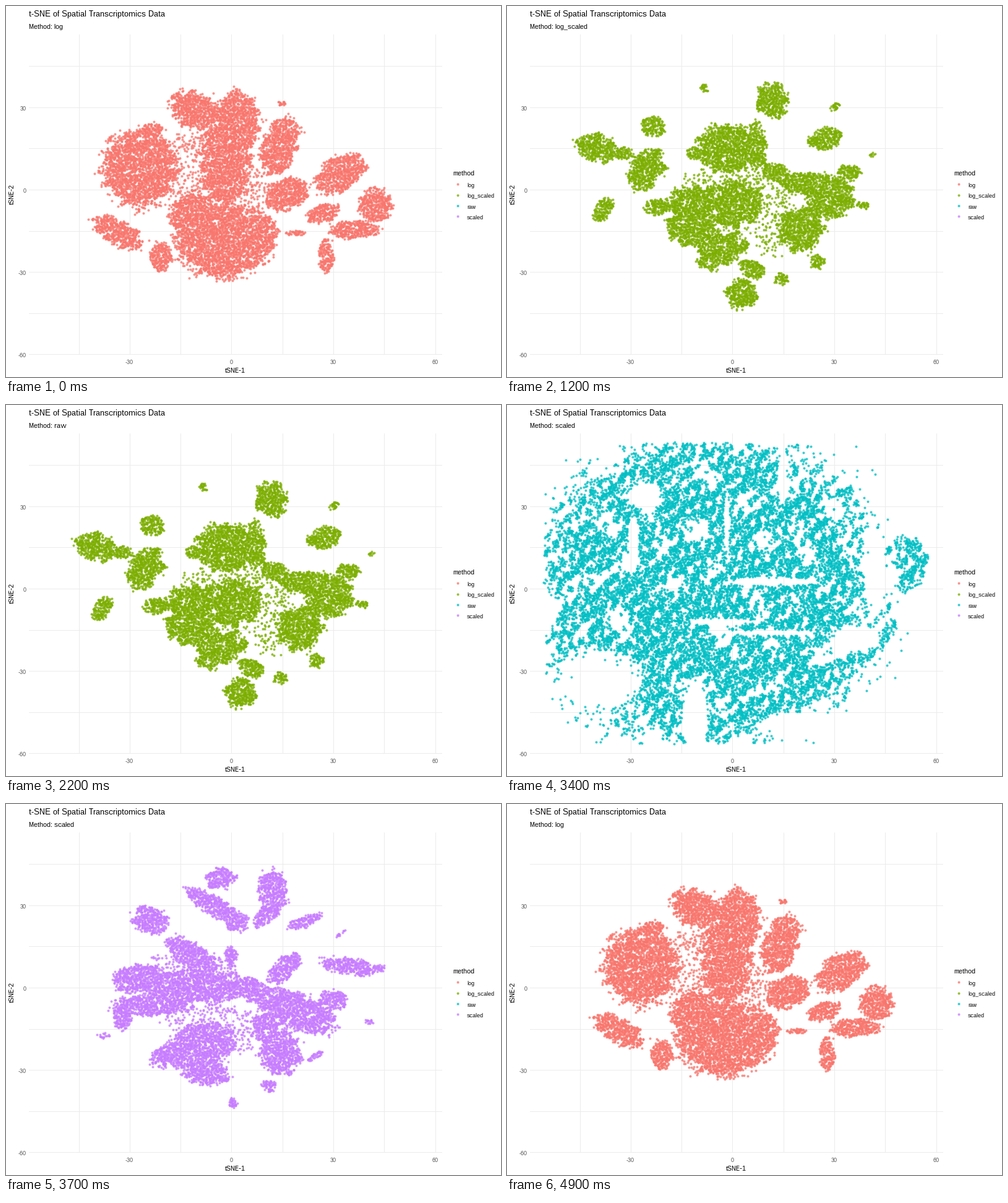
Animation, 800 px wide and 600 px high, one loop 5 s. Source, as a matplotlib script:

```python
import numpy as np
import matplotlib.pyplot as plt
from matplotlib.animation import FuncAnimation
from matplotlib.colors import to_rgba

WIDTH, HEIGHT, DPI = 800, 600, 100
PX = 72 / DPI
STEP_MS, LOOP_MS = 100, 5000
LEFT, RIGHT, TOP, BOTTOM = 37, 705, 46, 564
GRID, TICK = "#EBEBEB", "#4D4D4D"

METHODS = ["log", "log_scaled", "raw", "scaled"]
COLORS = ["#F8766D", "#7CAE00", "#00BFC4", "#C77CFF"]
TITLE_SWITCHES = [900, 2200, 3400, 4700]
CLOUD_SWITCHES = [1200, 2500, 3700, 4900]


def reach(x, y, blobs):
    """Squared distance to the nearest blob (x, y, rx, ry[, tilt]), 1 on its rim."""
    nearest = np.full(x.shape, np.inf)
    for cx, cy, rx, ry, *tilt in blobs:
        turn = np.radians(sum(tilt))
        c, s = np.cos(turn), np.sin(turn)
        dx, dy = x - cx, y - cy
        q = ((dx * c + dy * s) / rx) ** 2 + ((dy * c - dx * s) / ry) ** 2
        nearest = np.minimum(nearest, q)
    return nearest


def ripple(x, y, rng, shortest, longest, count=8):
    """Smooth random texture with unit spread."""
    total = 0
    for _ in range(count):
        angle, phase = rng.uniform(0, 2 * np.pi, 2)
        k = 2 * np.pi / rng.uniform(shortest, longest)
        total = total + np.sin(k * (x * np.cos(angle) + y * np.sin(angle)) + phase)
    return total / np.sqrt(count / 2)


def scatter_cloud(seed, blobs, haze=(), gaps=(), fill=0.9, clump=0.2, channels=0):
    """Seeded points that fill the blobs, thin out at rims and leave gaps."""
    rng = np.random.default_rng(seed)
    y, x = np.mgrid[62:548:2.2, 62:682:2.2].reshape(2, -1)
    x, y = x + rng.normal(0, 1.3, x.size), y + rng.normal(0, 1.3, y.size)
    fine = ripple(x, y, rng, 11, 30)
    broad = ripple(x, y, rng, 45, 90)

    def soft(shapes):
        return 1 / (1 + np.exp(np.minimum(9 * (reach(x, y, shapes) - 1 - 0.12 * fine), 50)))

    chance = (fill + clump * fine + channels * np.minimum(broad, 0)) * soft(blobs)
    chance = np.maximum(chance, 0.17 * soft(haze)) * (1 - soft(gaps))
    keep = rng.random(x.size) < chance
    return x[keep], y[keep]


log_points = scatter_cloud(11, [
    (217, 262, 58, 60), (235, 206, 17, 18), (372, 186, 36, 46), (308, 170, 45, 27, 25),
    (355, 240, 40, 85), (304, 340, 39, 40), (350, 378, 73, 57), (405, 370, 31, 38),
    (352, 422, 32, 19), (441, 226, 27, 46, 20), (453, 304, 35, 25, -20),
    (540, 270, 43, 25, -30), (597, 322, 26, 27), (562, 362, 39, 14), (512, 335, 25, 14, -15),
    (517, 404, 12, 26), (250, 404, 17, 23), (181, 366, 43, 19, 28), (467, 367, 16, 4),
    (445, 156, 7, 4),
], haze=[(305, 260, 45, 65), (400, 305, 25, 40)])

log_scaled_points = scatter_cloud(22, [
    (429, 152, 25, 27, -30), (513, 215, 27, 17, -15), (552, 270, 18, 12),
    (146, 230, 33, 21, 15), (188, 237, 18, 10), (236, 194, 18, 16), (225, 264, 25, 36, 35),
    (155, 329, 13, 20, 30), (358, 230, 50, 38), (402, 228, 16, 36), (304, 237, 14, 10),
    (436, 270, 24, 14, 25), (306, 318, 47, 29), (368, 320, 43, 37), (300, 360, 44, 26, 10),
    (241, 325, 19, 13), (348, 394, 42, 25, -25), (477, 287, 34, 17), (520, 308, 37, 35),
    (474, 360, 36, 35, -20), (378, 465, 24, 23), (396, 426, 20, 14, 25), (501, 413, 11, 12),
    (443, 442, 11, 9), (530, 163, 9, 5, -40), (590, 238, 6, 5), (320, 132, 6, 6),
    (574, 322, 9, 6),
], haze=[(380, 282, 85, 25), (425, 335, 35, 65)])

raw_points = scatter_cloud(33, [
    (325, 303, 255, 234), (88, 268, 21, 4), (238, 113, 31, 4), (546, 150, 10, 18, 30),
    (643, 256, 33, 42, 10), (585, 392, 11, 56, 50), (591, 228, 7, 3, -40),
], gaps=[
    (222, 147, 32, 22), (355, 190, 5, 60), (445, 120, 8, 45), (204, 220, 9, 45),
    (430, 285, 75, 7), (345, 350, 55, 6), (430, 368, 70, 5), (60, 330, 24, 30),
    (150, 445, 65, 50), (305, 500, 22, 60), (480, 520, 80, 22), (560, 378, 45, 22),
    (594, 270, 18, 65), (622, 278, 12, 20),
], fill=0.65, clump=0.35, channels=0.4)

scaled_points = scatter_cloud(44, [
    (346, 120, 23, 17), (430, 136, 22, 28), (427, 171, 35, 13, -45), (335, 164, 48, 15, 30),
    (373, 190, 18, 15), (233, 187, 28, 20, 15), (483, 190, 30, 8, -20), (300, 245, 47, 20, 35),
    (219, 283, 44, 24), (310, 295, 85, 26), (235, 325, 63, 16), (187, 345, 14, 20),
    (402, 303, 34, 17, 30), (449, 265, 32, 16, -45), (556, 262, 50, 13, 6),
    (528, 317, 22, 15), (468, 335, 62, 29, 20), (419, 358, 22, 24), (443, 402, 32, 34),
    (320, 385, 48, 32), (268, 403, 36, 19, -20), (320, 432, 38, 21, 10), (363, 246, 9, 17),
    (500, 408, 13, 5, -30), (425, 457, 12, 9), (367, 483, 7, 8), (157, 373, 10, 5),
    (587, 352, 8, 4), (540, 210, 11, 2, -35),
], haze=[(325, 350, 75, 25), (385, 370, 22, 35), (300, 262, 70, 25)])

plt.rcParams.update({"font.family": "Liberation Sans", "text.hinting": "native",
                     "text.hinting_factor": 1})
fig = plt.figure(figsize=(WIDTH / DPI, HEIGHT / DPI), dpi=DPI, facecolor="white")
ax = fig.add_axes([0, 0, 1, 1])
ax.set(xlim=(0, WIDTH), ylim=(HEIGHT, 0))
ax.axis("off")


def label(x, y, text, size=11, color="black", **style):
    return ax.text(x, y, text, fontsize=size * PX, color=color, **style)


def dots(x, y, color):
    tint = to_rgba(color, 0.7)
    return ax.plot(x, y, "o", ms=3 * PX, mew=PX, mfc=tint, mec=tint, zorder=3)[0]


def grid_line(x, y):
    ax.plot(x, y, color=GRID, lw=PX, snap=False, solid_capstyle="butt", zorder=1)


for i in range(8):
    x = int(118 + 82.3 * i) + 0.5
    y = int(97.6 + 66.6 * i) + 0.5
    grid_line([x, x], [TOP, BOTTOM])
    grid_line([LEFT, RIGHT], [y, y])

for i, value in enumerate((-30, 0, 30, 60)):
    label(199.5 + 164.8 * i, 579, f"{value}", 9, TICK, ha="center")
    label(32.5, 568 - 133 * i, f"{30 * i - 60}", 9, TICK, ha="right")

label(37, 17, "t-SNE of Spatial Transcriptomics Data", 13)
subtitle = label(37, 37, "")
label(370, 593, "tSNE-1", ha="center")
label(15, 304.5, "tSNE-2", rotation=90, ha="right", va="center")
label(722, 274, "method")
for i, (method, color) in enumerate(zip(METHODS, COLORS)):
    dots([730], [288.3 + 17.3 * i], color)
    label(745, 293 + 17.3 * i, method, 9)

clouds = [dots(*points, color) for points, color in
          zip((log_points, log_scaled_points, raw_points, scaled_points), COLORS)]


def current(time, switches):
    return sum(time >= s for s in switches) % len(METHODS)


def update(frame):
    time = frame * STEP_MS
    subtitle.set_text("Method: " + METHODS[current(time, TITLE_SWITCHES)])
    shown = current(time, CLOUD_SWITCHES)
    for i, cloud in enumerate(clouds):
        cloud.set_visible(i == shown)
    return [subtitle, *clouds]


animation = FuncAnimation(fig, update, frames=LOOP_MS // STEP_MS,
                          interval=STEP_MS, repeat=True, repeat_delay=0)
plt.show()
```
